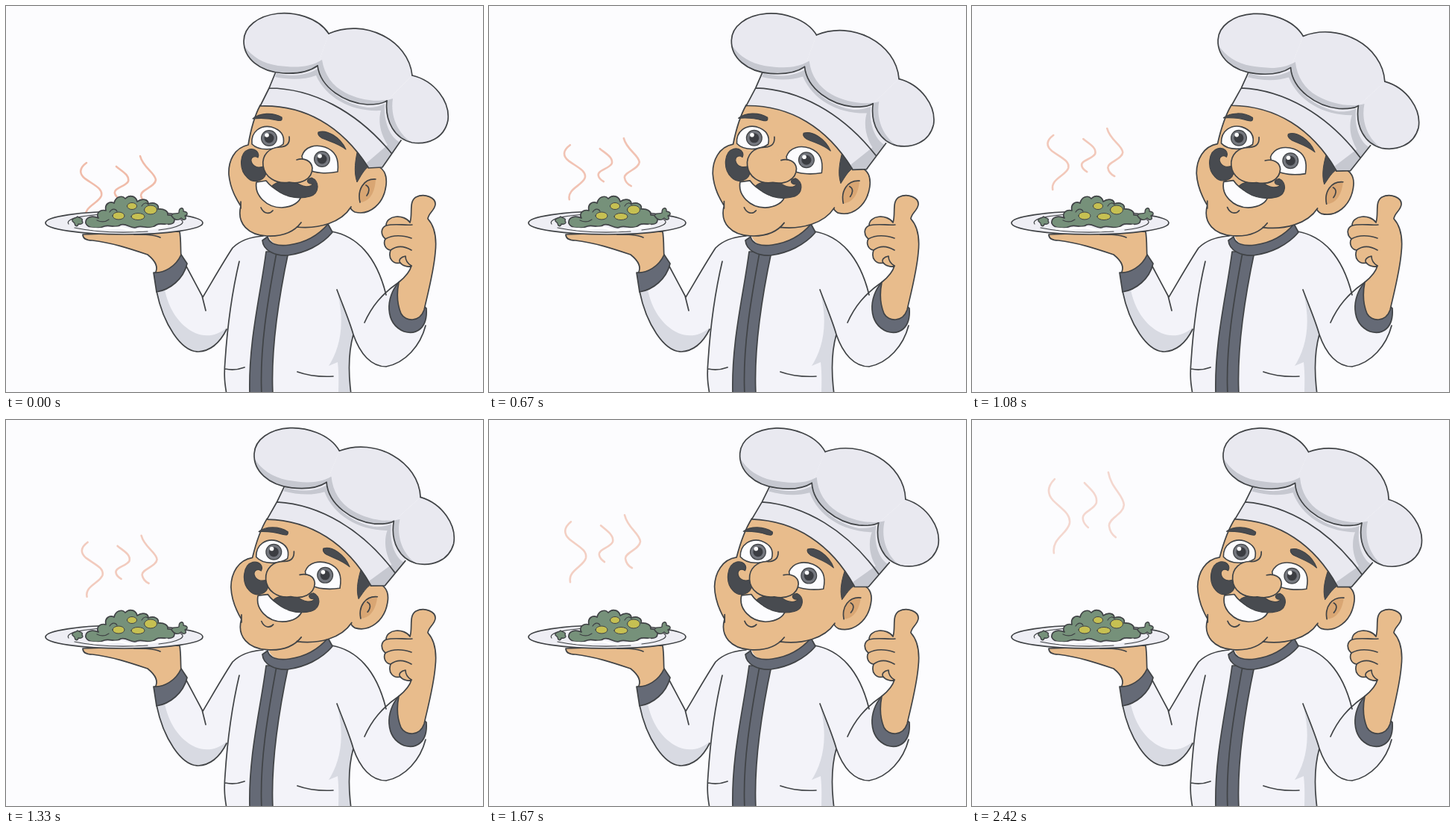
Recreate the animation shown at these times as an HTML page. Size 640 by 517 pixels, loop 2510 ms.

```html
<!DOCTYPE html>
<html lang="en">
<head>
<meta charset="utf-8">
<title>Chef</title>
<style>
html, body { margin: 0; height: 100%; overflow: hidden; background: #fcfcfe; }
svg { display: block; width: 100vw; height: 100vh; }
path { stroke-linecap: round; stroke-linejoin: round; }
</style>
</head>
<body>
<svg id="stage" viewBox="0 0 640 517"></svg>
<script>
const LOOP = 2510, FPS = 12;
const stage = document.getElementById('stage');
const INK = '#404346', SKIN = '#e8bc8c', TAN = '#d9a673', HAT = '#e9e9f0', COAT = '#f3f3f9',
      GREY = '#656a76', HAIR = '#484b50', SHADE = '#c6c8d0', FOLD = '#d8dae2',
      LEAF = '#76917a', CORN = '#c6c052';
const head = [], steam = [];

function add(d, fill = 'none', stroke = INK, width = 1.7, list) {
  const el = document.createElementNS('http://www.w3.org/2000/svg', 'path');
  const attrs = { d, fill, stroke, 'stroke-width': width };
  for (const k in attrs) el.setAttribute(k, attrs[k]);
  stage.append(el);
  if (list) list.push({ el, d });
}
const face = (d, fill, stroke, width) => add(d, fill, stroke, width, head);
const dot = (p, r, color) => face(`M${p}h.01`, 'none', color, r * 2);
const oval = (x, y, rx, ry) => `M${x - rx},${y}a${rx},${ry} 0 1 1 ${2 * rx},0a${rx},${ry} 0 1 1 ${-2 * rx},0Z`;

// Steam: y runs from 0 (top) to 1 (bottom)
[['M108,0C98,.1 98,.2 106,.29C118,.41 130,.47 128,.6C125,.74 104,.8 107,1', 0, 73],
 ['M148,0C156,.15 166,.26 164,.45C160,.62 144,.65 146,.82C147,.92 150,.96 153,1', 5, 44],
 ['M180,0C184,.25 200,.34 201,.5C200,.65 181,.7 181,.82C182,.92 186,.97 190,1', -9, 64]
].forEach(([d, top, len]) => {
  add(d, 'none', INK, 2.6, steam);
  Object.assign(steam.at(-1), { top, len });
});

// Left hand, plate and food
add('M103,306C103,312 108,314 116,314C142,317 166,325 190,333C200,341 205,350 200,358C215,357 229,350 235,336C234,325 235,315 233,302Z', SKIN);
add('M172,306C185,306 198,306 207,310');
add(oval(158.5, 290.5, 105.5, 15.5), '#eeeef4');
add('M84,292C78,284 110,280 132,279M232,285C245,290 232,297 205,300M92,297C120,303 158,304 190,302', 'none', INK, 1.2);
add('M107,291C106,283 115,280 124,284C120,277 127,272 134,274C132,265 139,261 145,264C147,255 156,253 160,258C167,251 175,256 176,262C183,257 191,259 191,265C199,262 206,266 204,272C212,271 218,275 217,280C224,279 228,284 225,290C219,296 208,289 202,293C193,301 184,293 176,296C168,300 162,290 154,293C146,299 140,292 132,295C124,299 110,298 107,291Z', LEAF);
add('M113,298C130,301 142,296 152,297C162,297 166,303 178,300C190,300 200,297 216,294', 'none', '#fff', 3);
add('M89,288C88,283 94,285 96,282C99,285 104,284 102,288C105,291 100,293 97,292C96,297 92,294 92,291ZM222,281C223,276 229,279 232,277C232,269 239,269 238,275C245,276 244,280 240,281C244,286 238,288 235,284C231,288 226,287 222,281Z', LEAF, INK, 1.4);
[[169, 268, 6.5, 4.5], [194, 273, 8.5, 6], [151, 281, 8, 5], [177, 282, 9, 4.5]]
  .forEach(p => add(oval(...p), CORN, INK, 1));
add('M182,268C185,263 189,263 191,266M139,276C142,271 147,271 149,275M122,287C128,290 134,289 138,286', 'none', INK, 1.2);

// Coat
add('M202,382C211,426 235,463 258,463C276,462 288,449 296,433C294,462 293,490 296,520H463C459,490 459,465 466,440C475,466 490,483 510,483C536,478 556,455 564,430L527,370L510,387C495,334 470,308 437,302L345,308C330,309 315,313 306,322C292,342 276,370 264,390L240,345Z', COAT, 'none');
add('M203,384C212,426 235,462 258,462C276,461 288,447 296,431C283,442 268,444 254,438C232,428 218,405 213,380Z', FOLD, 'none');
add('M445,385C456,430 446,462 433,482L445,477C447,495 446,508 446,518H463C459,485 460,462 466,440Z', FOLD, 'none');
add('M202,382C211,426 235,463 258,463C276,462 288,449 296,433M240,345L264,390C276,370 292,342 304,324C315,313 330,309 345,308M263,388L268,408');
add('M313,342C304,380 297,430 294,475C292,498 294,508 296,520M294,486C303,488 312,487 320,484');
add('M437,302C470,308 497,334 510,387M444,380C453,404 461,422 466,440C459,465 459,490 463,520M466,440C475,466 490,483 510,483C536,478 556,455 563,428M527,370C504,386 491,402 481,424M391,490C405,495 420,497 439,496');
add('M349,329C341,390 325,450 327,520H358C355,460 366,390 379,329Z', GREY);
add('M363,330C351,395 340,460 343,520');
add('M352,304C352,314 360,322 377,321C400,319 420,308 433,292L400,285Z', SKIN, 'none');
add('M351,309C353,319 365,322 380,320C402,317 420,306 432,292L438,303C423,321 400,331 378,334C360,335 345,327 344,314Z', GREY);
add('M198,357L202,383C220,380 238,366 243,345L235,333C228,349 212,358 198,357Z', GREY);

// Right hand
add('M527,370C509,390 508,425 534,436C550,441 566,432 564,405L558,400Z', GREY);
add('M542,290C546,278 540,262 550,256C562,250 577,257 576,266C575,274 567,277 566,285C576,296 578,312 576,330C574,355 566,385 561,407C555,424 536,423 530,412C523,395 525,380 527,370C537,362 542,355 544,348C540,351 531,347 529,344C520,346 512,339 516,327C508,326 506,317 509,312C502,306 503,297 510,294C510,280 534,278 542,290Z', SKIN);
add('M510,294C522,291 533,294 545,293M509,312C520,306 532,307 544,311M516,327C524,321 534,321 544,327M529,344C526,340 530,336 536,335C536,340 539,345 544,348', 'none', INK, 1.6);

// Face
face('M478,214C503,208 512,222 510,240C507,265 488,281 468,276C460,272 460,266 464,255Z', SKIN);
face('M341,133C333,148 328,168 325,186C306,190 298,208 299,226C301,246 310,260 315,268C309,292 326,307 350,308C372,309 385,303 392,296C420,298 450,290 463,269C472,262 474,240 480,218L488,208C450,160 400,132 341,133Z', SKIN, 'none');
face('M496,232C480,231 471,246 475,263C488,262 495,250 496,232Z', TAN, 'none');
face('M341,133C333,148 328,168 325,186C306,190 298,208 299,226C301,246 310,260 315,268C309,292 326,307 350,308C372,309 387,302 396,290M390,296C420,299 450,290 463,269M315,262V271M496,232C480,231 471,246 475,263M483,240C489,243 487,250 484,254');
face('M472,192L488,214C480,219 476,228 471,236C466,222 469,205 472,192Z', HAIR, INK, 1);
face('M331,151C340,143 358,142 370,149C371,154 368,154 363,153C352,150 342,150 331,151ZM419,169C430,165 448,175 456,192C446,184 436,182 424,177C419,174 418,172 419,169Z', HAIR, INK, 1.2);
face('M330,185C328,168 342,159 356,162C370,166 374,175 372,185C362,193 340,195 330,185ZM397,201C401,188 415,185 428,189C442,194 447,204 445,222C430,225 414,224 406,219C402,214 398,208 397,201Z', '#fcfcfe', INK, 1.6);
for (const [x, y] of [[353, 177], [424, 205]]) {
  dot(`${x},${y}`, 11, INK);
  dot(`${x},${y}`, 9.8, '#74777e');
  dot(`${x},${y}`, 6.5, '#3b3d42');
  dot(`${x - 3},${y - 4}`, 2.8, '#fff');
}
face('M336,236C333,254 350,270 370,270C386,269 394,262 396,255C378,256 358,246 349,234Z', '#fcfcfe');
face('M342,270C346,279 354,279 358,274');
face('M349,221C349,234 333,239 324,230C312,219 313,196 326,192C334,190 341,196 338,203C334,200 328,202 329,208C331,216 340,218 347,214ZM357,241C365,233 378,236 388,235C398,244 409,243 412,238C404,239 401,232 410,230C421,234 421,251 408,255C390,260 370,255 357,241Z', HAIR, INK, 1.2);
face('M372,189C355,187 343,200 345,214C347,229 362,239 380,236C396,239 411,232 411,217C410,207 402,204 395,206Z', SKIN, 'none');
face('M380,175C381,183 378,188 368,189C353,189 343,200 345,214C347,229 362,239 380,236C396,239 411,232 411,217C410,207 400,203 390,206');

// Hat
face('M362,86L353,110L341,134C400,132 450,160 484,212L486,217L505,216L530,178L500,110L420,75Z', HAT, 'none');
face('M363,90C385,96 405,92 418,84C424,112 455,132 485,136C495,136 502,134 508,131C506,160 519,178 528,182L505,216L486,217L484,210L512,186C500,168 500,150 503,140C465,142 430,124 416,93C400,99 380,99 361,95Z', SHADE, 'none');
face('M362,88L353,110L341,134C400,132 450,160 486,216M353,110C410,110 470,140 517,197M530,180L505,216L486,217');
const middle = 'M433,37C480,16 540,45 545,93L511,127C505,131 497,132 485,132C455,130 422,110 418,80Z';
const left = 'M433,37C418,14 385,8 365,10C338,13 319,28 319,47C319,70 340,88 372,90C390,91 407,88 418,80Z';
const right = 'M545,93C575,100 596,128 593,153C588,178 565,186 545,183C522,178 508,155 511,127Z';
[middle, left, right].forEach(d => face(d, HAT, 'none'));
face('M320,54C323,74 344,90 372,90C390,91 407,88 418,80C422,110 455,130 485,132C497,132 505,130 511,127C508,155 522,178 545,183C528,173 515,150 519,124C500,130 474,126 455,116C438,107 427,92 424,72C405,84 385,82 365,80C345,77 330,68 320,54Z', SHADE, 'none');
[middle, left, right].forEach(d => face(d.replace('L511,127', 'M511,127').slice(0, -1)));

function track(keys, t) {
  const i = Math.max(1, keys.findIndex(k => k[0] >= t));
  const [t0, a] = keys[i - 1], [t1, b] = keys[i];
  return a + (b - a) * (t - t0) / (t1 - t0);
}
const TILT = [[0, 0], [250, .003], [420, .009], [670, .025], [920, .036], [1330, .055], [1700, .071], [LOOP, .071]];
const RISE = [[0, 210], [420, 200], [670, 186], [920, 179], [1330, 164], [1670, 136], [LOOP, 72]];
const STRETCH = [[0, 1], [1330, 1], [1670, 1.11], [LOOP, 1.39]];

const warp = (d, move) => d.replace(/(-?[\d.]+),(-?[\d.]+)/g, (_, x, y) =>
  move(+x, +y).map(n => n.toFixed(2)).join());

// The head leans about the chin, less so in its lower part
function lean(angle) {
  return (x, y) => {
    const low = Math.max(0, (y - 130) / 170);
    const a = angle * Math.max(.45, 1 - low * low);
    const dx = x - 362, dy = y - 300, c = Math.cos(a), s = Math.sin(a);
    return [362 + dx * c - dy * s, 300 + dx * s + dy * c];
  };
}

function draw(t) {
  const move = lean(track(TILT, t));
  for (const p of head) p.el.setAttribute('d', warp(p.d, move));

  const y0 = track(RISE, t), k = track(STRETCH, t), u = t / LOOP;
  const color = `rgb(${240 + 4 * u},${188 + 28 * u},${170 + 38 * u})`;
  for (const p of steam) {
    p.el.setAttribute('d', warp(p.d, (x, y) => [x + 3 * u, y0 + p.top + y * p.len * k]));
    p.el.setAttribute('stroke', color);
  }
}

function tick(now) {
  const t = now % LOOP;
  draw(Math.min(29, Math.floor((t + 4) * FPS / 1000)) * 1000 / FPS);
  requestAnimationFrame(tick);
}
draw(0);
requestAnimationFrame(tick);
</script>
</body>
</html>
```
